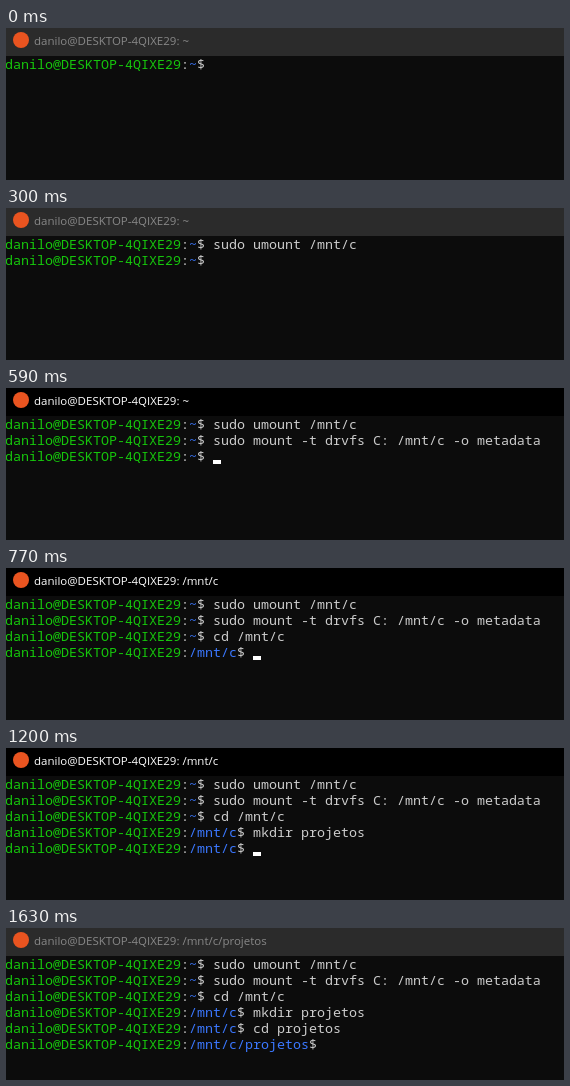
These frames come from a looping animation (558 by 152 pixels, 3700 ms). An HTML page with a canvas:

```html
<!DOCTYPE html>
<html lang="pt">
<head>
<meta charset="utf-8">
<title>Terminal</title>
<style>
  html, body { margin: 0; width: 100%; height: 100%; overflow: hidden; background: #0c0c0c; }
  canvas { display: block; }
</style>
</head>
<body>
<canvas id="stage" width="558" height="152"></canvas>
<script>
const ctx = document.getElementById('stage').getContext('2d');
const LOOP = 3700, CELL = 8, LINE = 16, LEFT = -1, TOP = 28;
const HOST = 'danilo@DESKTOP-4QIXE29';
const MONO = '13.333px "Noto Sans Mono", "DejaVu Sans Mono", monospace';
const SANS = '11.5px "Open Sans", "Noto Sans", sans-serif';

const session = [
  ['~', 'sudo umount /mnt/c'],
  ['~', 'sudo mount -t drvfs C: /mnt/c -o metadata'],
  ['~', 'cd /mnt/c'],
  ['/mnt/c', 'mkdir projetos'],
  ['/mnt/c', 'cd projetos'],
  ['/mnt/c/projetos', '']
];

const events = [
  [30, 'focus'], [80, 'blink'], [130, 'paste'], [170, 'blink'], [210, 'enter'], [260, 'blink'], [300, 'blur'],
  [350, 'focus'], [390, 'paste'], [440, 'blink'], [480, 'enter'], [530, 'blur'],
  [560, 'focus'], [610, 'paste'], [650, 'blink'], [690, 'enter'], [730, 'blink'], [770, 'blink'], [820, 'blur'],
  [870, 'focus'], [920, 'blink'], [970, 'paste'], [1020, 'blink'], [1070, 'blink'],
  [1120, 'enter'], [1160, 'blink'], [1200, 'blink'], [1250, 'blur'],
  [1300, 'focus'], [1350, 'paste'], [1400, 'enter'],
  [1450, 'blink'], [1490, 'blink'], [1540, 'blink'], [1580, 'blink'], [1630, 'blur']
];

const actions = {
  focus(s) { s.active = s.cursor = true; },
  blur(s) { s.active = s.cursor = false; },
  blink(s) { s.cursor = !s.cursor; },
  paste(s) { s.typed = s.cursor = true; },
  enter(s) { s.row++; s.typed = false; s.cursor = true; }
};

function stateAt(t) {
  const s = { row: 0, typed: false, active: false, cursor: false };
  for (const [time, name] of events) {
    if (time > t) break;
    actions[name](s);
  }
  return s;
}

function rect(x, y, w, h, color) {
  ctx.fillStyle = color;
  ctx.fillRect(x, y, w, h);
}

function drawTitle(active, cwd) {
  rect(0, 0, 558, TOP, active ? '#000' : '#2b2b2b');
  ctx.fillStyle = '#e95420';
  ctx.beginPath();
  ctx.arc(15, 12, 8, 0, Math.PI * 2);
  ctx.fill();
  ctx.font = SANS;
  ctx.fillStyle = active ? '#fff' : '#888';
  ctx.fillText(HOST + ': ' + cwd, 28, 17);
}

// Draws one prompt line and returns the column after it.
function drawLine(row, cwd, cmd) {
  const parts = [[HOST, '#16c60c'], [':', '#ccc'], [cwd, '#3b78ff'], ['$ ' + cmd, '#ccc']];
  let col = 0;
  ctx.font = MONO;
  for (const [text, color] of parts) {
    ctx.fillStyle = color;
    ctx.fillText(text, LEFT + col * CELL, TOP + row * LINE + 13);
    col += text.length;
  }
  return col;
}

function draw(t) {
  const s = stateAt(t);
  rect(0, 0, 558, 152, '#0c0c0c');
  drawTitle(s.active, session[s.row][0]);
  let col = 0;
  for (let row = 0; row <= s.row; row++) {
    const [cwd, cmd] = session[row];
    col = drawLine(row, cwd, row < s.row || s.typed ? cmd : '');
  }
  if (s.cursor) rect(LEFT + col * CELL, TOP + (s.row + 1) * LINE - 4, CELL, 4, '#fff');
}

const start = performance.now();
function tick() {
  draw((performance.now() - start) % LOOP);
  requestAnimationFrame(tick);
}
tick();
</script>
</body>
</html>
```
